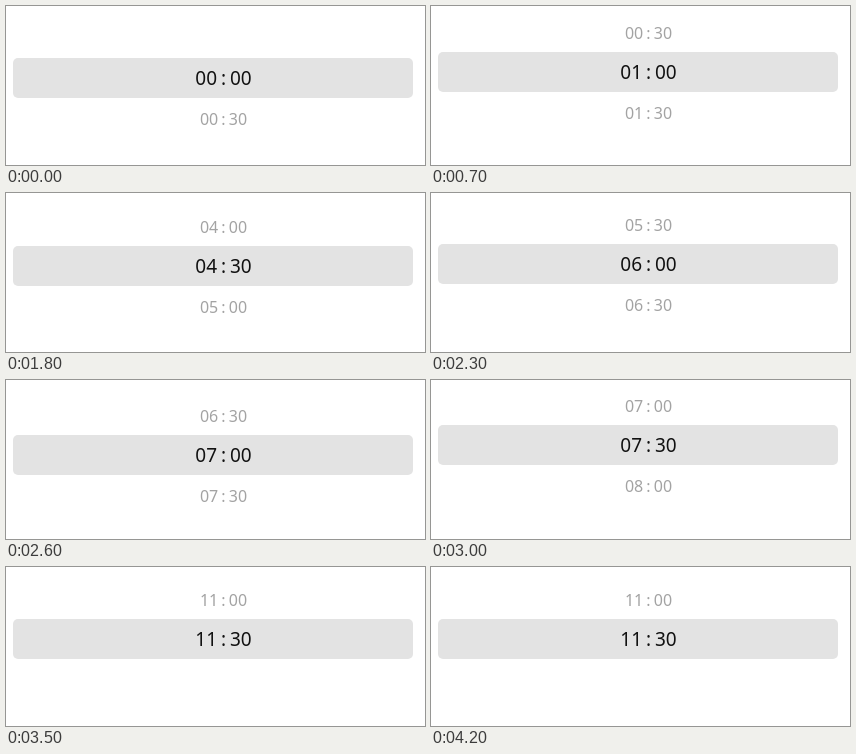
Animation, 419 px wide and 159 px high, one loop 5.7 s. Source, as an HTML page with a canvas:

```html
<!DOCTYPE html>
<html lang="en">
<head>
<meta charset="utf-8">
<title>Time picker</title>
<style>
  html, body { margin: 0; width: 100%; height: 100%; overflow: hidden; background: #fff; }
  canvas { display: block; }
</style>
</head>
<body>
<canvas width="419" height="159"></canvas>
<script>
const ctx = document.querySelector('canvas').getContext('2d');
const LOOP = 5700, TICK = 100, ROW = 40, LAST = 23;

// Each flick eases out from the row before it to its own row.
const flicks = [
  { start: 600, end: 900, row: 3, power: 3.1 },
  { start: 1400, end: 1900, row: 9, power: 3.5 },
  { start: 2100, end: 2700, row: 14, power: 2.3 },
  { start: 2964, end: 3500, row: 23, power: 2 },
  { start: 3600, end: 3800, row: 22, power: 1.4 },
  { start: 3800, end: 4000, row: 23, power: 1.4 }
];

function scrollAt(time) {
  let row = 0;
  for (const { start, end, row: target, power } of flicks) {
    const progress = Math.min(1, Math.max(0, (time - start) / (end - start)));
    row += (target - row) * (1 - (1 - progress) ** power);
  }
  return Math.round(row * ROW);
}

const pad = n => String(n).padStart(2, '0');
const label = i => `${pad(Math.floor(i / 2))} : ${pad(i % 2 * 30)}`;

function drawTime(index, baseline, size, color) {
  if (index < 0 || index > LAST) return;
  ctx.font = `${size}px "Noto Sans", sans-serif`;
  ctx.fillStyle = color;
  ctx.fillText(label(index), 217.5, baseline);
}

function draw(time) {
  const scroll = scrollAt(time);
  const selected = Math.round(scroll / ROW);
  const shift = selected * ROW - scroll;

  ctx.fillStyle = '#fff';
  ctx.fillRect(0, 0, 419, 159);
  ctx.fillStyle = '#e3e3e3';
  ctx.beginPath();
  ctx.roundRect(7, 52 + shift, 400, ROW, 5);
  ctx.fill();

  ctx.textAlign = 'center';
  ctx.wordSpacing = '-1px';
  drawTime(selected - 1, 39 + shift, 16, '#a3a3a3');
  drawTime(selected, 79 + shift, 19, '#111');
  drawTime(selected + 1, 119 + shift, 16, '#a3a3a3');
}

const begin = performance.now();
function frame() {
  const time = (performance.now() - begin) % LOOP;
  draw(Math.floor(time / TICK) * TICK);
  requestAnimationFrame(frame);
}
frame();
</script>
</body>
</html>
```
